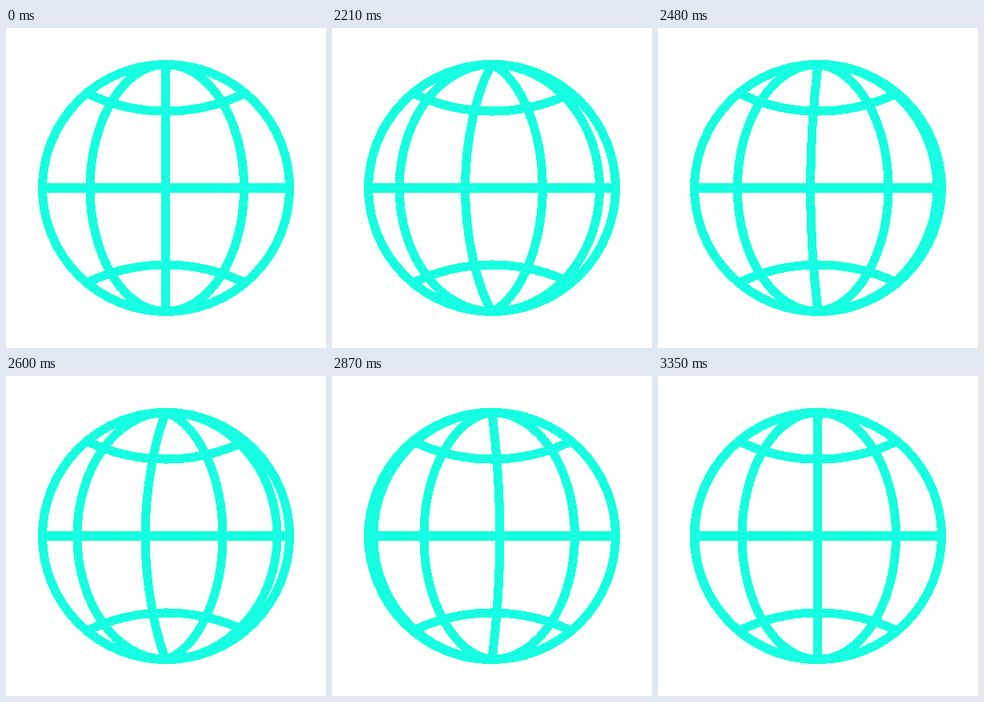
An HTML page with a canvas that plays this animation: 400x400 px, repeating every 3440 ms.

```html
<!DOCTYPE html>
<html lang="en">
<head>
<meta charset="utf-8">
<title>Spinning globe</title>
<style>
  html, body { margin: 0; width: 100%; height: 100%; overflow: hidden; background: #fff; }
  canvas { display: block; width: 400px; height: 400px; }
</style>
</head>
<body>
<canvas id="stage" width="400" height="400"></canvas>
<script>
const SIZE = 400;
const ctx = document.getElementById('stage').getContext('2d', { willReadFrequently: true });
const LOOP = 3440, SPIN_START = 2000, STEP = 30, STEPS = 45, TURNS = 7;
const RADIUS = 154.5, KAPPA = 0.5523, STRAIGHT = 0.31;

// Resting meridians, left to right; each one glides to its right neighbour.
const STOPS = [
  { bulge: -RADIUS, round: 1 },
  { bulge: -95, round: 1 },
  { bulge: -0.3, round: 0 },
  { bulge: 97.5, round: 1 },
  { bulge: RADIUS, round: 1 }
];

const mix = (a, b, t) => a + (b - a) * t;

const bezier = (s, a, b) =>
  3 * (1 - s) ** 2 * s * a + 3 * (1 - s) * s * s * b + s ** 3;

function ease(x) {
  if (x <= 0 || x >= 1) return x <= 0 ? 0 : 1;
  let low = 0, high = 1;
  for (let i = 0; i < 30; i++) {
    const mid = (low + high) / 2;
    if (bezier(mid, 0.167, 0.457) < x) low = mid; else high = mid;
  }
  return bezier(low, 0.167, 1);
}

function stroke(trace) {
  ctx.beginPath();
  trace();
  ctx.stroke();
}

function line(x1, y1, x2, y2) {
  stroke(() => { ctx.moveTo(x1, y1); ctx.lineTo(x2, y2); });
}

// A half ellipse that straightens as its roundness drops to zero.
function meridian(from, to, t) {
  const bulge = mix(from.bulge, to.bulge, t);
  const round = mix(from.round, to.round, t);
  const poleX = bulge * KAPPA;
  const poleY = RADIUS * (1 - (1 - round) * STRAIGHT);
  const sideY = RADIUS * mix(STRAIGHT, KAPPA, round);
  stroke(() => {
    ctx.moveTo(0, -RADIUS);
    ctx.bezierCurveTo(poleX, -poleY, bulge, -sideY, bulge, 0);
    ctx.bezierCurveTo(bulge, sideY, poleX, poleY, 0, RADIUS);
  });
}

function parallels() {
  const r = 229, half = Math.asin(98 / r), down = Math.PI / 2;
  stroke(() => ctx.arc(0, -96 - r, r, down - half, down + half));
  stroke(() => ctx.arc(0, 96 + r, r, -down - half, -down + half));
}

// Turn soft edges into hard ones.
function harden() {
  const image = ctx.getImageData(0, 0, SIZE, SIZE);
  const pixels = new Uint32Array(image.data.buffer);
  const [r, g, b] = [22, 255, 224];
  const ink = (255 << 24 | b << 16 | g << 8 | r) >>> 0;
  for (let i = 0; i < pixels.length; i++) pixels[i] = pixels[i] >>> 24 >= 120 ? ink : 0xffffffff;
  ctx.putImageData(image, 0, 0);
}

function draw(step) {
  const phase = TURNS * ease(step / STEPS) % 1;
  ctx.setTransform(1, 0, 0, 1, 0, 0);
  ctx.clearRect(0, 0, SIZE, SIZE);
  ctx.translate(SIZE / 2, SIZE / 2);
  ctx.lineWidth = 11;
  stroke(() => ctx.arc(0, 0, RADIUS, 0, Math.PI * 2));
  line(-RADIUS, 0, RADIUS, 0);
  parallels();
  // The incoming meridian shows up one step after the spin begins.
  const first = step > 1 ? 0 : 1;
  for (let i = first; i < STOPS.length - 1; i++) meridian(STOPS[i], STOPS[i + 1], phase);
  harden();
}

const start = performance.now();
let shown;
function tick() {
  const time = (performance.now() - start) % LOOP;
  const step = Math.min(STEPS, Math.max(0, Math.floor((time - SPIN_START) / STEP)));
  if (step !== shown) draw(shown = step);
  requestAnimationFrame(tick);
}
tick();
</script>
</body>
</html>
```
